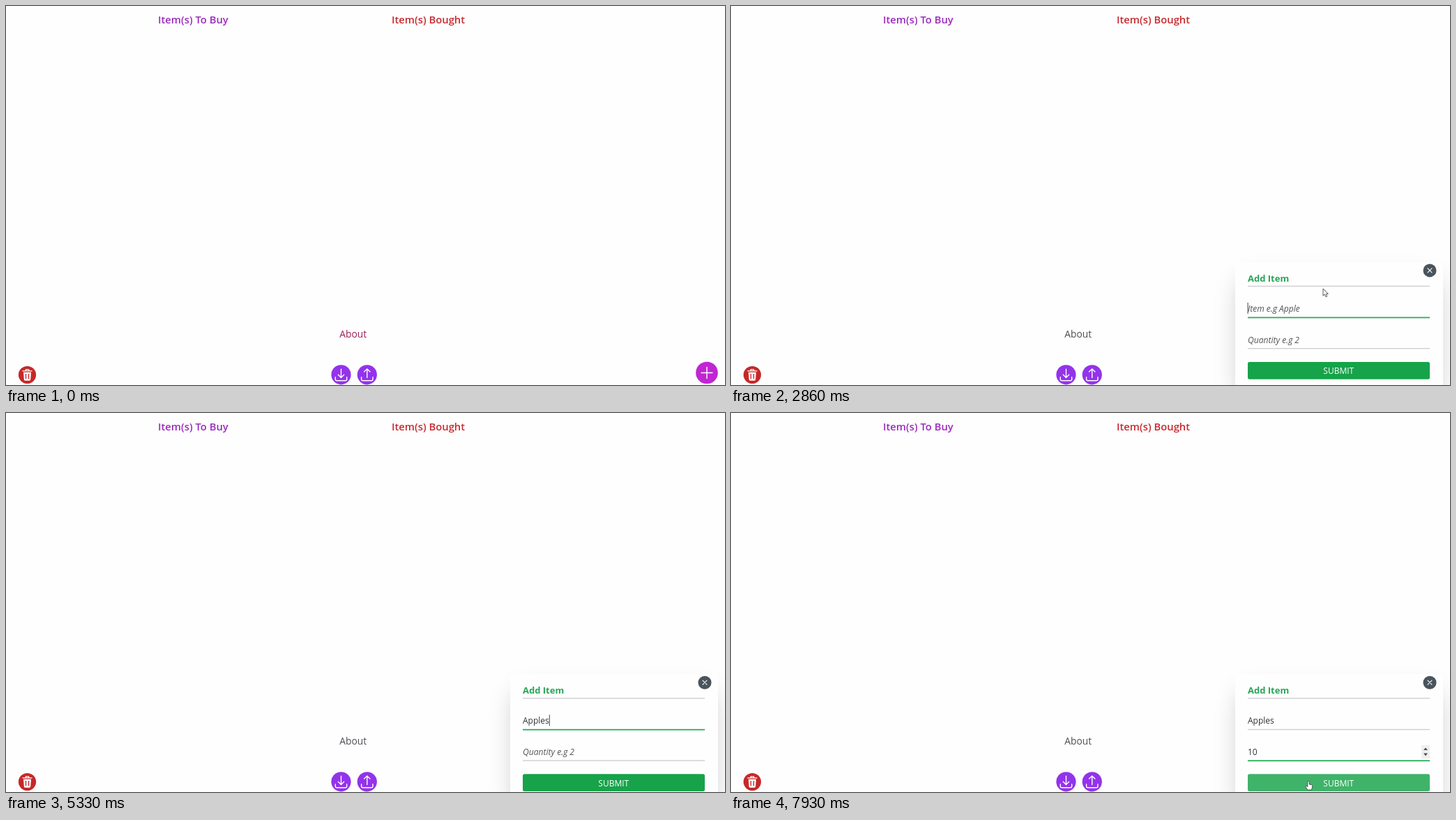
Write an HTML page that moves like this. It is 1031 px wide and 543 px high and loops after 8 s.

```html
<!DOCTYPE html>
<html lang="en">
<head>
<meta charset="utf-8">
<title>Shopping list</title>
<style>
  html, body { margin: 0; width: 100%; height: 100%; overflow: hidden; background: #fefefe; }
  svg { display: block; font: 12px "Open Sans", "Noto Sans", sans-serif; }
  .head { font-size: 14.8px; font-weight: 600; }
  .hint { font-size: 12.1px; font-style: italic; fill: #555; }
  .icon { fill: none; stroke: #fff; stroke-width: 1.4; stroke-linecap: round; stroke-linejoin: round; }
  .rule { height: 1.4px; fill: #cfcfd3; }
  .rule.focus { height: 1.8px; fill: #2bad5c; }
  .cursor { fill: #fff; stroke: #444; stroke-width: .9; stroke-linejoin: round; }
</style>
</head>
<body>
<svg width="1031" height="543" viewBox="0 0 1031 543">
  <text class="head" x="218" y="24.5" fill="#9b2bbd">Item(s) To Buy</text>
  <text class="head" x="553" y="24.5" fill="#c62a2f">Item(s) Bought</text>
  <text id="about" x="478.3" y="475" font-size="13.8">About</text>

  <g transform="translate(30.5 528.5)">
    <circle r="12.6" fill="#c62828"/>
    <path d="M-6.5-5.6H6.5M-2.2-6v-1.6h4.4V-6" class="icon"/>
    <path d="M-5.5-3.8h11l-.8 10.6q-.1 1.4-1.5 1.4h-6.4q-1.4 0-1.5-1.4z" fill="#fff"/>
    <path d="M-2-1.5v7.2M2-1.5v7.2" stroke="#c62828" stroke-width="1.4"/>
  </g>
  <g transform="translate(480.5 528.3)">
    <circle r="14.1" fill="#9333ea"/>
    <path class="icon" d="M0-8V4M-4.2 0L0 4.2 4.2 0M-8.2 3.5v3q0 2 2 2H6.2q2 0 2-2v-3"/>
  </g>
  <g transform="translate(517.8 528.3)">
    <circle r="14.1" fill="#9333ea"/>
    <path class="icon" d="M0 4.2V-8.2M-4.2-4.2L0-8.4 4.2-4.2M-8.2 3.5v3q0 2 2 2H6.2q2 0 2-2v-3"/>
  </g>
  <g id="plus" transform="translate(1005 525.5)">
    <circle id="ring" r="17.3" fill="none" stroke="#c026d3" stroke-width="1.2"/>
    <circle r="15.8" fill="#c026d3"/>
    <path class="icon" stroke-width="1.6" d="M-8 0H8M0-8V8"/>
  </g>

  <g id="modal">
    <rect x="732" y="402" width="280" height="168" fill="#000" opacity=".25" style="filter:blur(19px)"/>
    <rect x="723" y="374" width="298" height="187" rx="4" fill="#fefefe"/>
    <text x="741" y="402" font-size="13" font-weight="700" fill="#27a555">Add Item</text>
    <rect class="rule" x="741" y="408" width="261"/>
    <circle cx="1002" cy="386.2" r="9.5" fill="#4a545c"/>
    <path class="icon" style="stroke-width:1.1" d="M999 383.2l6 6m0-6l-6 6"/>
    <text id="item" x="741" y="445.3"/>
    <rect id="itemRule" x="741" y="452.8" width="261"/>
    <text id="qty" x="741" y="490.2"/>
    <rect id="qtyRule" x="741" y="497.3" width="261"/>
    <g id="spin">
      <rect x="990" y="476" width="12" height="19" fill="#efefef"/>
      <path d="M993 483l3-3.6 3 3.6zM993 487.6l3 3.6 3-3.6z" fill="#4c4c4c"/>
    </g>
    <rect id="caret" width="1" height="16" fill="#444"/>
    <rect id="submit" x="741" y="517.3" width="261" height="24.8" rx="2.5" fill="#16a34a"/>
    <text x="871.3" y="534.8" text-anchor="middle" fill="#fff">SUBMIT</text>
  </g>

  <path id="arrow" class="cursor" d="M0 0V10.2L2.4 8 4.1 11.8 5.8 11 4.2 7.4H7.3z"/>
  <path id="hand" class="cursor" d="M-1.2 1Q0-.8 1.2 1V5L4.5 5.6Q6 6 5.8 7.6L5 11.2 4.2 13H-1.2L-4 8.6Q-4.2 7-2.6 7.4L-1.2 8.6z"/>
</svg>
<script>
  const LOOP = 8000, STEP = 130;
  const $ = id => document.getElementById(id);
  const show = (id, on) => $(id).style.display = on ? "" : "none";
  const within = (t, a, b) => t >= a && t < b;

  // Each key is [time, value, value, ...]
  function track(keys, t) {
    if (t <= keys[0][0]) return keys[0].slice(1);
    for (let i = 1; i < keys.length; i++) {
      const a = keys[i - 1], b = keys[i];
      if (t <= b[0]) {
        const k = (t - a[0]) / (b[0] - a[0]);
        return a.slice(1).map((v, j) => v + (b[j + 1] - v) * k);
      }
    }
    return keys[keys.length - 1].slice(1);
  }

  const typed = (word, times, t) => word.slice(0, times.filter(k => k <= t).length);

  const slide = [[2340, 190], [2470, 150], [2730, 0], [2860, -7.3], [3120, 0]];
  const pointer = [
    [1950, 1000, 546], [2210, 1005, 523], [2470, 1005, 523], [2860, 849, 405],
    [3120, 800, 425], [7540, 800, 500], [7800, 824, 523], [7930, 828, 527]
  ];
  const itemKeys = [4290, 4420, 4680, 4810, 5070, 5200];
  const qtyKeys = [6890, 7280];
  const QTY_FOCUS = 5980;

  function field(id, value, hint, focused) {
    const el = $(id);
    el.textContent = value || hint;
    el.setAttribute("class", value ? "" : "hint");
    el.setAttribute("fill", "#333");
    $(id + "Rule").setAttribute("class", focused ? "rule focus" : "rule");
    if (focused) {
      $("caret").setAttribute("x", 741 + (value ? el.getComputedTextLength() : -.4));
      $("caret").setAttribute("y", id === "item" ? 432.3 : 477.2);
    }
  }

  function draw(t) {
    const open = t >= 2340, onQty = t >= QTY_FOCUS;
    $("about").setAttribute("fill", t < 2600 ? "#9d1f55" : "#4f4d55");

    show("plus", t < 2600);
    show("ring", t >= 2210);
    $("plus").setAttribute("opacity", track([[1950, 1], [2210, .36]], t)[0]);

    show("modal", open);
    $("modal").setAttribute("transform", `translate(0 ${track(slide, t)[0]})`);
    field("item", typed("Apples", itemKeys, t), "Item e.g Apple", !onQty);
    field("qty", typed("10", qtyKeys, t), "Quantity e.g 2", onQty);
    show("spin", onQty);
    show("caret", !(within(t, 3380, 3640) || within(t, 4160, 4290) ||
      within(t, 6500, 6890) || t >= 7800));
    $("submit").setAttribute("opacity", track([[7600, 1], [7800, .82]], t)[0]);

    const [x, y] = track(pointer, t);
    for (const id of ["arrow", "hand"]) $(id).setAttribute("transform", `translate(${x} ${y})`);
    show("arrow", within(t, 2600, 3120));
    show("hand", within(t, 1950, 2600) || t >= 7670);
  }

  const start = performance.now();
  function tick() {
    const t = (performance.now() - start) % LOOP;
    draw(Math.floor(t / STEP) * STEP);
    requestAnimationFrame(tick);
  }
  tick();
</script>
</body>
</html>
```
